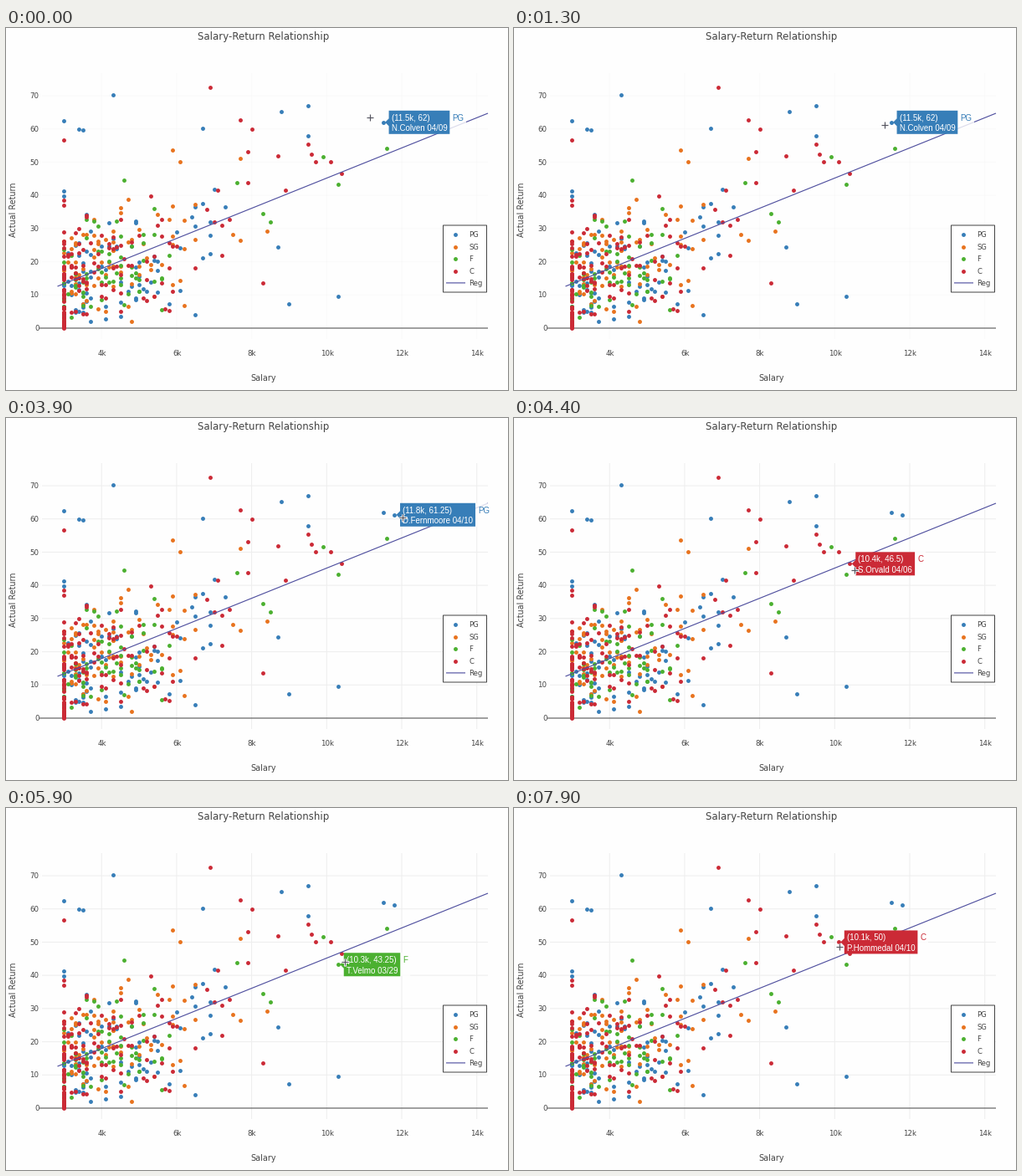
Recreate the animation shown at these times as a matplotlib script. Size 600 by 433 pixels, loop 8000 ms.

```python
import numpy as np
import matplotlib.pyplot as plt
from matplotlib.animation import FuncAnimation
from matplotlib.patches import Rectangle

W, H, DPI = 600, 433, 100
STEP, LOOP = 100, 8000
PX = 72 / DPI
INK, TREND_COLOR = "#444444", "#50509f"
COLORS = {"PG": "#377eb8", "SG": "#e8731e", "F": "#4bb030", "C": "#cb2a36"}

# Points that stand clear of the crowd: salary in thousands, return
OUTLIERS = {
    "PG": [(4.3, 70.2), (3, 62.5), (3.4, 60), (3.5, 59.7), (6.7, 60.2), (8.8, 65.2),
           (9.5, 67), (9.5, 58), (9, 7.2), (10.3, 9.5), (8.7, 24.5)],
    "SG": [(5.9, 53.7), (6.1, 50), (8.4, 29.2)],
    "F": [(4.6, 44.5), (9.9, 51.7), (8.3, 34.5), (8.5, 32)],
    "C": [(6.9, 72.5), (7.7, 62.7), (8, 60), (3, 56.7), (9.5, 55.5), (9.6, 52.5),
          (8.7, 52), (9.7, 50.2), (8.9, 41.5), (8.3, 13.5)],
}
# Crowd sizes: minimum-salary column, spread along the trend
CROWD = {"PG": (12, 78), "SG": (10, 75), "F": (14, 58), "C": (50, 85)}

# start ms, trace, salary, return, player, mouse position
HOVERS = [
    (0, "PG", 11.5, 62, "N.Colven 04/09", (443, 116)),
    (1500, "F", 11.6, 54.25, "B.Oravetodunmek 04/07", (458, 141)),
    (3100, "PG", 11.8, 61.25, "D.Fernmoore 04/10", (474, 119)),
    (4200, "C", 10.4, 46.5, "S.Orvald 04/06", (407, 182)),
    (5500, "F", 10.3, 43.25, "T.Velmo 03/29", (405, 184)),
    (7000, "C", 10.1, 50, "P.Hommedal 04/10", (389, 166)),
]
MOUSE_START = (435, 107)


def sx(k):
    return 114.2 + (np.asarray(k) - 4) * 44.85


def sy(v):
    return 359 - 3.971 * np.asarray(v)


def trend(k):
    return 4.55 * k - .4


fig = plt.figure(figsize=(W / DPI, H / DPI), dpi=DPI, facecolor="#fefefe")
ax = fig.add_axes([0, 0, 1, 1])
ax.set(xlim=(0, W), ylim=(H, 0))
ax.axis("off")


def label(x, y, text, size, color=INK, font="DejaVu Sans", **kw):
    return ax.text(x, y, text, fontsize=size * PX, color=color, family=font, **kw)


def line(xs, ys, color, width, z):
    return ax.plot(xs, ys, color=color, lw=width * PX, zorder=z, snap=False,
                   solid_capstyle="butt")[0]


def dots(x, y, color, z):
    ax.scatter(x, y, s=(4.9 * PX) ** 2, color=color, linewidths=0, zorder=z)


# Axes and grid
grid = []
for k in range(4, 15, 2):
    grid.append(line([sx(k)] * 2, [54, 372], "#eeeeee", 1, 1))
    label(sx(k) + .3, 392, f"{k}k", 8.7, ha="center")
for v in range(0, 71, 10):
    if v:
        grid.append(line([43, 576], [sy(v)] * 2, "#eeeeee", 1, 1))
    label(39.5, sy(v) + 3.2, str(v), 8.7, ha="right")
line([40, 576], [359, 359], INK, 1, 2)
label(307.5, 14, "Salary-Return Relationship", 11.7, ha="center")
label(308, 421.5, "Salary", 9.6, ha="center")
label(14.5, 217, "Actual Return", 9.6, rotation=90, ha="right", va="center")

# Data
rng = np.random.default_rng(12)
for z, (name, color) in enumerate(COLORS.items(), 3):
    column, spread = CROWD[name]
    hovered = [h[2:4] for h in HOVERS if h[1] == name]
    px, py = np.array(OUTLIERS[name] + hovered).T
    low = rng.exponential(13, column) % 42
    k = np.round(3.1 + rng.exponential(1.8, spread) % 4.8, 1)
    v = rng.triangular(1, trend(k) - 3, trend(k) + 20)
    dots(sx(np.r_[px, np.full(column, 3), k]), sy(np.r_[py, low, v]), color, z)
line([61.5, 576], [309, 102], TREND_COLOR, 1.15, 7)

# Legend
ax.add_patch(Rectangle((522.5, 236), 52, 80, fc="white", ec=INK, lw=PX,
                       snap=False, zorder=8))
rows = 247.3 + 14.4 * np.arange(5)
for y, name in zip(rows, [*COLORS, "Reg"]):
    label(553, y + 3.2, name, 8.5, zorder=9)
    if name in COLORS:
        dots([537.3], [y], COLORS[name], 9)
line([526, 549], [rows[-1]] * 2, TREND_COLOR, 1.15, 9)


def make_hover(trace, k, v, player):
    """Tooltip with an arrow to its point and the trace name beside it."""
    x, y, color = sx(k), sy(v), COLORS[trace]
    left, top, bottom = x + 7, y - 14, y + 14
    style = dict(font="Liberation Sans", zorder=12)
    lines = [(-2.2, f"({k:g}k, {v:g})"), (10.3, player)]
    texts = [label(left + 3, y + dy, s, 9.8, "white", **style) for dy, s in lines]
    right = left + 6 + max(t.get_window_extent().width for t in texts)
    tag = label(right + 3, y - 2.2, trace, 9.8, color, **style)
    back = Rectangle((right, top), tag.get_window_extent().width + 6, 28,
                     fc="white", alpha=.8, lw=0, zorder=10)
    ax.add_patch(back)
    box = ax.fill([x + 2.5, left, left, right, right, left, left],
                  [y, y - 4.5, top, top, bottom, bottom, y + 4.5],
                  fc=color, lw=0, zorder=11)[0]
    return [*texts, tag, back, box]


hovers = [make_hover(*h[1:5]) for h in HOVERS]
starts = [h[0] for h in HOVERS]

# The mouse rests at each hover and travels around the moment it changes
path = [(0, *MOUSE_START)]
for (start, *_, spot), end in zip(HOVERS, starts[1:] + [LOOP]):
    path += [(start + 200, *spot), (end - 200, *spot)]
path = np.array(path)
mouse = [ax.plot([], [], marker="+", ms=size * PX, mew=width * PX, color=color,
                 zorder=13)[0]
         for size, width, color in ((9, 3, "white"), (8, 1.2, "#555560"))]


def update(frame):
    t = frame * STEP
    active = np.searchsorted(starts, t, side="right") - 1
    for i, group in enumerate(hovers):
        for artist in group:
            artist.set_visible(i == active)
    for g in grid:
        g.set_alpha(1 if t >= 1500 else .25)
    x, y = (np.interp(t, path[:, 0], path[:, c]) for c in (1, 2))
    for m in mouse:
        m.set_data([x], [y])
    return []


anim = FuncAnimation(fig, update, frames=LOOP // STEP, interval=STEP,
                     repeat=True, repeat_delay=0, blit=False)
plt.show()
```
